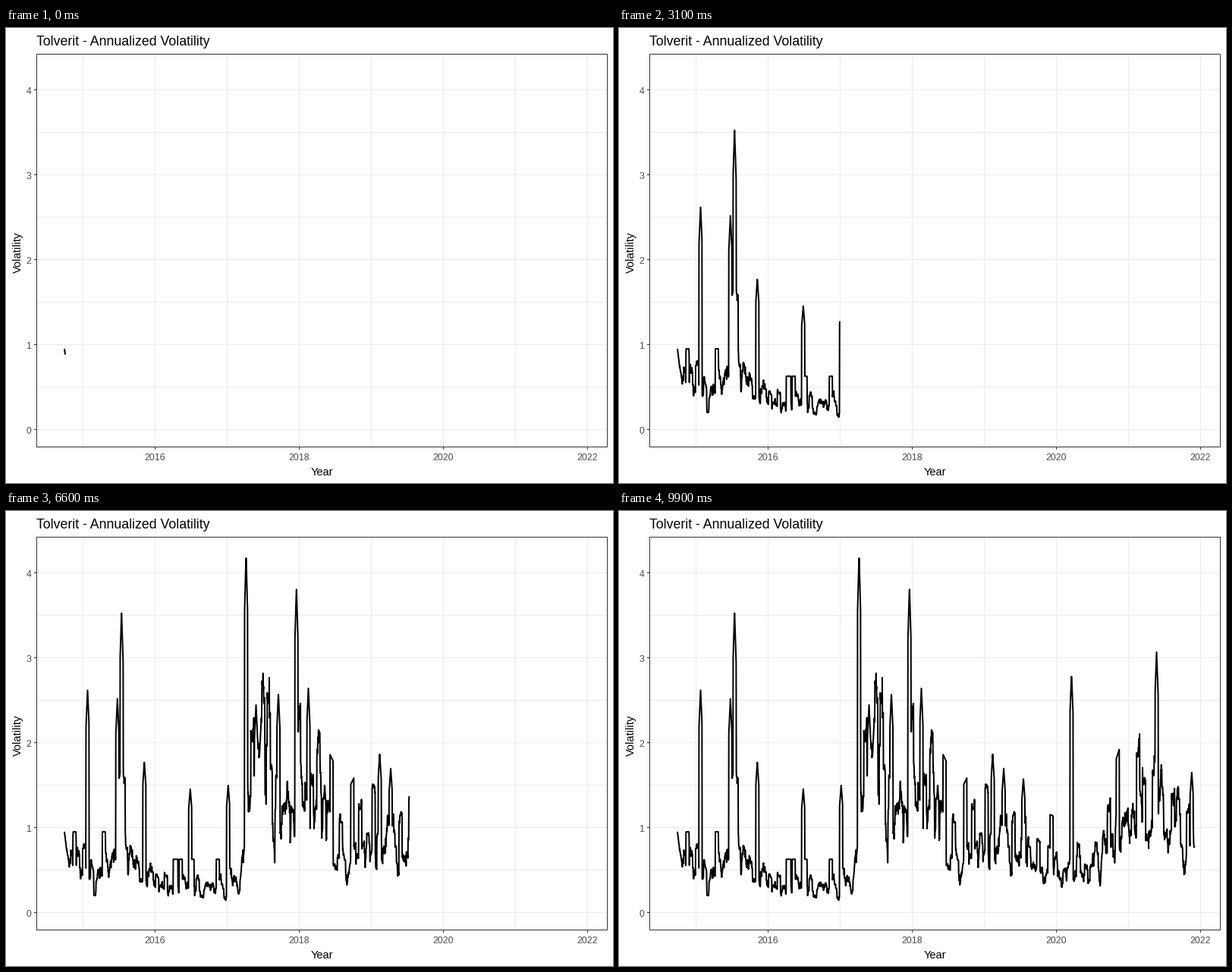
Recreate the animation shown at these times as a matplotlib script. Size 800 by 600 pixels, loop 10000 ms.

```python
import numpy as np
import matplotlib.pyplot as plt
from matplotlib.animation import FuncAnimation

W, H, DPI = 800, 600, 100
FRAMES, INTERVAL = 100, 100
LEFT, RIGHT, TOP, BOTTOM = 40.5, 792.5, 34.5, 552.5
X_START, X_FIRST, X_LAST = 76.8, 78, 758
DAY = 95 / 365
WINDOW = 16  # days in the rolling volatility
GRID, DARK, GREY = "#ebebeb", "#333333", "#4d4d4d"

plt.rcParams["font.family"] = "Liberation Sans"
plt.rcParams["path.snap"] = False


def pt(px):
    return px * 72 / DPI


def year_x(year):
    return 196.5 + (year - 2016) * 95


def vol_y(v):
    return 529.5 - 112 * v


# Typical level over time, and the main peaks above it: (x, volatility)
LEVEL = [(77, .95), (84, .5), (135, .5), (155, 1.2), (172, .5), (215, .33),
         (308, .33), (322, 1.6), (395, 1.3), (450, .75), (480, 1.05),
         (545, .65), (625, .5), (672, 1.2), (758, .9)]
PEAKS = [(107.5, 2.62), (146.8, 2.52), (152.3, 3.53), (182.3, 1.78),
         (242.8, 1.46), (292.8, 1.5), (316.4, 4.21), (329.5, 2.45),
         (336.5, 2.3), (359, 2.58), (382.8, 3.83), (398.5, 2.64),
         (492.5, 1.87), (507, 1.7), (533, 1.58), (596.4, 2.8),
         (708.5, 3.07), (754.8, 1.65)]


def series(x):
    # Rolling spread of heavy-tailed daily returns around the typical level
    rng = np.random.default_rng(12)
    shocks = rng.standard_t(3, len(x) + WINDOW - 1)
    spread = np.sqrt(np.convolve(shocks ** 2, np.ones(WINDOW), "valid"))
    spread = np.clip(spread / np.median(spread), .4, 1.9)
    spread = 1 + (spread - 1) * np.clip((x - X_FIRST) / 6, 0, 1)
    vol = np.interp(x, *zip(*LEVEL)) * spread

    # Each peak stays in the rolling window for its whole width
    for px, height in PEAKS:
        d = np.abs(x - px)
        plateau = height * (1 - .08 * d)
        vol = np.where(d < WINDOW * DAY / 2, np.maximum(vol, plateau), vol)
    return np.clip(vol, .08, 4.21)


fig = plt.figure(figsize=(W / DPI, H / DPI), dpi=DPI, facecolor="white")
ax = fig.add_axes([0, 0, 1, 1])
ax.set_xlim(0, W)
ax.set_ylim(H, 0)
ax.axis("off")


def rule(xs, ys, color):
    ax.plot(xs, ys, color=color, lw=pt(1), solid_capstyle="butt")


def label(x, y, text, px, color="black", **kw):
    ax.text(x, y, text, fontsize=pt(px), color=color, va="baseline", **kw)


for year in range(2015, 2023):
    rule([year_x(year)] * 2, [TOP, BOTTOM], GRID)
for half in range(9):
    rule([LEFT, RIGHT], [vol_y(half / 2)] * 2, GRID)

for year in range(2016, 2023, 2):
    rule([year_x(year)] * 2, [BOTTOM, BOTTOM + 3.5], DARK)
    label(year_x(year), 570, str(year), 12.4, GREY, ha="center")
for v in range(5):
    rule([LEFT - 3.5, LEFT], [vol_y(v)] * 2, DARK)
    label(33.5, vol_y(v) + 5.5, str(v), 12.4, GREY, ha="right")

label(40, 23, "Tolverit - Annualized Volatility", 17.7)
label(416, 590, "Year", 14.67, ha="center")
label(20, 295.5, "Volatility", 14.67, ha="center",
      rotation=90, rotation_mode="anchor")

xs = np.arange(X_START, X_LAST + DAY, DAY)
ys = vol_y(series(xs))
line, = ax.plot([], [], color="black", lw=pt(2), solid_capstyle="butt",
                solid_joinstyle="round", zorder=3)
ax.add_patch(plt.Rectangle((LEFT, TOP), RIGHT - LEFT, BOTTOM - TOP,
                           fill=False, ec=DARK, lw=pt(1), zorder=4))


def update(i):
    end = X_FIRST + (X_LAST - X_FIRST) * i / (FRAMES - 1)
    n = np.searchsorted(xs, end)
    line.set_data(np.append(xs[:n], end),
                  np.append(ys[:n], np.interp(end, xs, ys)))
    return line,


anim = FuncAnimation(fig, update, frames=FRAMES, interval=INTERVAL,
                     repeat=True, repeat_delay=0)
plt.show()
```
